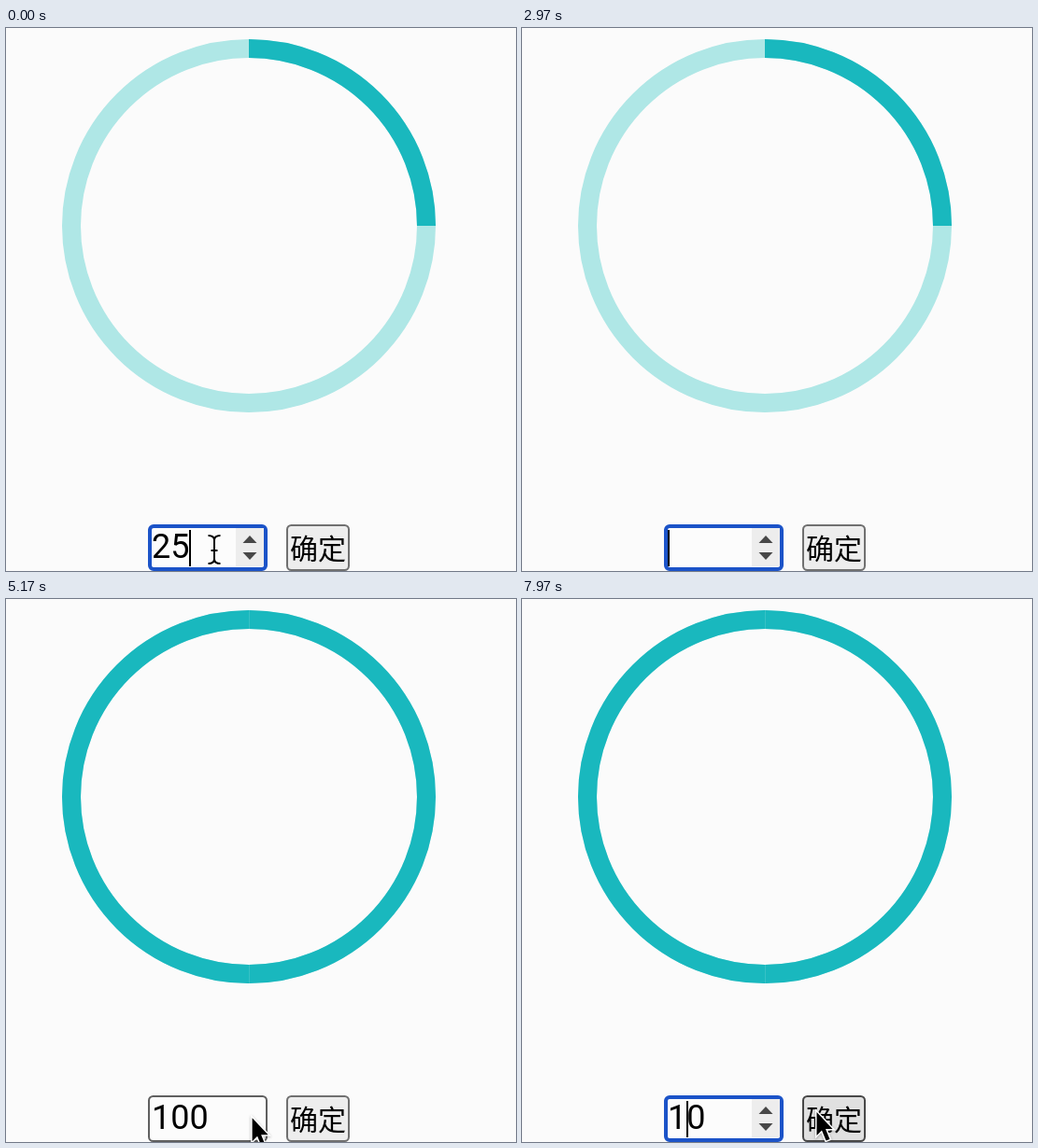
Recreate the animation shown at these times as an HTML page with a canvas. Size 546 px wide and 582 px high, loop 8000 ms.

```html
<!DOCTYPE html>
<html lang="zh">
<head>
<meta charset="utf-8">
<title>Progress ring</title>
<style>
html, body { margin: 0; width: 100%; height: 100%; overflow: hidden; background: #fbfbfb; }
canvas { display: block; }
</style>
</head>
<body>
<canvas id="stage" width="546" height="582"></canvas>
<script>
const ctx = document.getElementById('stage').getContext('2d');
const LOOP = 8000, LAG = 40, CLICK = 140, BLINK = 500;
const FIELD = { x: 152, y: 532, w: 128, h: 50 };
const BUTTON = { x: 300, y: 532, w: 68, h: 50 };

const moves = [
  { at: 0, dur: 300, x: 184, y: 559 },
  { at: 470, dur: 330, x: 342, y: 552 },
  { at: 1183, dur: 550, x: 220, y: 559 },
  { at: 4000, dur: 400, x: 351, y: 549 },
  { at: 5038, dur: 240, x: 198, y: 558 },
  { at: 6900, dur: 950, x: 314, y: 548 }
];
const clicks = [900, 1780, 4600, 5560];
const APPLY = clicks[2] + CLICK;

// Each edit restarts the caret blink and hides the pointer until it next moves
const edits = [
  { at: 0, text: '25', caret: 2 },
  { at: 2550, text: '2', caret: 1 },
  { at: 2810, text: '', caret: 0 },
  { at: 3480, text: '1', caret: 1 },
  { at: 3640, text: '10', caret: 2 },
  { at: 3800, text: '100', caret: 3 },
  { at: 5850, text: '10', caret: 1 }
];

const ease = k => k * k * (3 - 2 * k);
const latest = (list, t) => list.filter(e => e.at <= t).pop();

function pointerAt(t) {
  const pos = { x: 223, y: 559 };
  for (const m of moves) {
    const k = ease(Math.min(1, Math.max(0, (t - m.at) / m.dur)));
    pos.x += (m.x - pos.x) * k;
    pos.y += (m.y - pos.y) * k;
  }
  return pos;
}

// Clicks alternate between the button and the field
function hasFocus(t) {
  return clicks.filter(c => c + CLICK / 2 + 20 < t).length % 2 === 0;
}

function arc(from, to, color) {
  ctx.beginPath();
  ctx.arc(260, 212, 190, from, to);
  ctx.lineWidth = 20;
  ctx.strokeStyle = color;
  ctx.stroke();
}

function ring(value) {
  const top = -Math.PI / 2, full = Math.PI * 2;
  arc(0, full, '#afe7e6');
  arc(top, top + full * value / 100, '#19b8be');
  if (value === 100) {
    ctx.fillStyle = 'rgba(175,231,230,.2)';
    for (const y of [12, 392]) ctx.fillRect(260, y, 1, 20);
  }
}

function box({ x, y, w, h }, line, border, fill) {
  ctx.beginPath();
  ctx.roundRect(x + line / 2, y + line / 2, w - line, h - line, 5 - line / 4);
  ctx.fillStyle = fill;
  ctx.fill();
  ctx.lineWidth = line;
  ctx.strokeStyle = border;
  ctx.stroke();
}

function triangle(y, tip) {
  ctx.beginPath();
  ctx.moveTo(253.5, y);
  ctx.lineTo(268.5, y);
  ctx.lineTo(261, tip);
  ctx.fill();
}

function field(t, focus, hover) {
  const { at, text, caret } = latest(edits, t);
  box(FIELD, focus ? 4 : 2, focus ? '#1b53c8' : hover ? '#383838' : '#606060', '#fcfcfc');
  ctx.font = '36px Roboto, Arial, sans-serif';
  ctx.fillStyle = '#000';
  ctx.fillText(text, 156, 568);
  if (focus || hover) {
    ctx.fillStyle = '#ededed';
    ctx.fillRect(246, 536, 30, 41);
    ctx.fillStyle = '#484848';
    triangle(552, 544);
    triangle(562, 570);
  }
  if (focus && (t - at) % (2 * BLINK) < BLINK) {
    ctx.fillStyle = '#000';
    ctx.fillRect(156 + 20 * caret, 538, 2, 39);
  }
}

function button(hover) {
  box(BUTTON, 2, hover ? '#484848' : '#707070', hover ? '#e0e0e0' : '#ededed');
  ctx.font = '500 30px "Noto Sans CJK SC", "Noto Sans CJK", sans-serif';
  ctx.fillStyle = '#000';
  ctx.fillText('确定', 304, 569);
}

function arrow() {
  const p = new Path2D('M1.5 2V27L7 21.5L11.5 32.5L15.5 31L11 20H18.5Z');
  ctx.shadowColor = 'rgba(0,0,0,.3)';
  ctx.shadowBlur = 3;
  ctx.shadowOffsetY = 1;
  ctx.lineWidth = 3;
  ctx.strokeStyle = '#fff';
  ctx.stroke(p);
  ctx.shadowColor = 'transparent';
  ctx.fillStyle = '#000';
  ctx.fill(p);
}

function beam() {
  const p = new Path2D('M-6.5 -15Q0 -15 0 -10Q0 -15 6.5 -15M0 -10V10M-6.5 15Q0 15 0 10Q0 15 6.5 15M-3.5 1H3.5');
  for (const [width, color] of [[4.5, '#fff'], [2, '#000']]) {
    ctx.lineWidth = width;
    ctx.strokeStyle = color;
    ctx.stroke(p);
  }
}

function pointer(t, overField) {
  const { x, y } = pointerAt(t);
  ctx.save();
  ctx.translate(x, y);
  if (clicks.some(c => t >= c && t < c + CLICK)) {
    ctx.beginPath();
    ctx.arc(-1, 3, 43, 0, Math.PI * 2);
    ctx.lineWidth = 3;
    ctx.strokeStyle = '#000';
    ctx.stroke();
  }
  if (overField) beam();
  else arrow();
  ctx.restore();
}

function draw(t) {
  const seen = pointerAt(t - LAG);
  const overField = seen.x < FIELD.x + FIELD.w + 1;
  ctx.fillStyle = '#fbfbfb';
  ctx.fillRect(0, 0, 546, 582);
  ring(t < APPLY ? 25 : 100);
  field(t, hasFocus(t), overField);
  button(seen.x >= BUTTON.x);
  const lastUse = Math.max(latest(moves, t).at, ...clicks.filter(c => c <= t));
  if (latest(edits, t).at <= lastUse) pointer(t, overField);
}

const begin = performance.now();
function tick() {
  draw((performance.now() - begin) % LOOP);
  requestAnimationFrame(tick);
}
tick();
</script>
</body>
</html>
```
